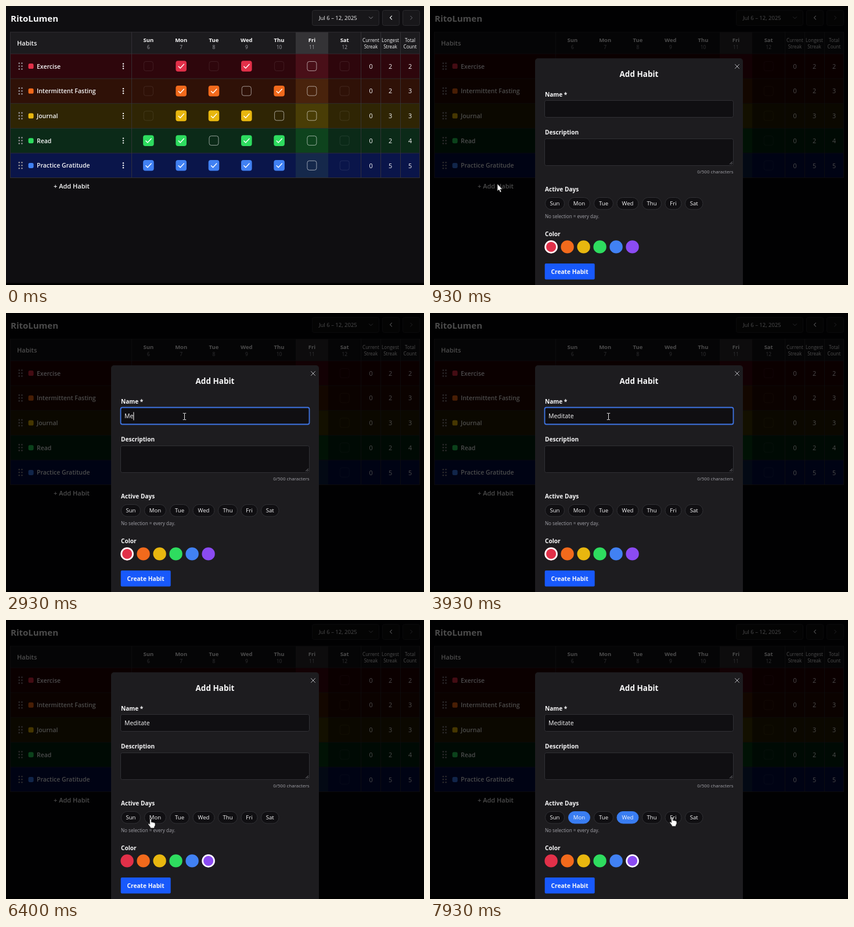
Write an HTML page that moves like this. It is 720 px wide and 480 px high and loops after 8 s.

```html
<!DOCTYPE html>
<html lang="en">
<head>
<meta charset="utf-8">
<title>Habit tracker</title>
<style>
  html, body { margin: 0; width: 100%; height: 100%; overflow: hidden; background: #0f0e11; }
  svg { display: block; width: 720px; height: 480px; font-family: "Open Sans", "Noto Sans", sans-serif; }
  text { fill: #f7f7f8; white-space: pre; }
  .semi { font-weight: 600; }
  .bold { font-weight: 700; }
  .medium { font-weight: 500; }
  .muted { fill: #a3a3aa; }
  .mid { text-anchor: middle; }
  .end { text-anchor: end; }
  .line { fill: none; stroke-linecap: round; stroke-linejoin: round; }
</style>
</head>
<body>
<svg id="stage" viewBox="0 0 720 480"></svg>
<script>
const LOOP = 8000;
const DAYS = ['Sun', 'Mon', 'Tue', 'Wed', 'Thu', 'Fri', 'Sat'];
const COLORS = ['#e23049', '#f26a1c', '#e8b70f', '#2edc5f', '#4181f3', '#8b4bf2'];
const NAME = 'Meditate';

// marks: x = done, o = open, - = inactive
const HABITS = [
  { name: 'Exercise', marks: '-x-x-o-', stats: [0, 2, 2], row: '#2e060c', today: '#490f18' },
  { name: 'Intermittent Fasting', marks: '-xxoxo-', stats: [0, 2, 3], row: '#2f1107', today: '#49230c' },
  { name: 'Journal', marks: '-xxxoo-', stats: [0, 3, 3], row: '#2f2504', today: '#493d06' },
  { name: 'Read', marks: 'xxoxxo-', stats: [0, 2, 4], row: '#0b2a18', today: '#0e431d' },
  { name: 'Practice Gratitude', marks: 'xxxxxo-', stats: [0, 5, 5], row: '#0a154a', today: '#15284b' },
];
const STATS = [['Current', 628.5], ['Longest', 662], ['Total', 696]];
const PILLS = [[198, 34], [238, 38], [282, 34], [321.5, 38], [365, 34], [404.5, 29], [439, 31.5]];

const text = (x, y, size, content, cls = '', extra = '') =>
  `<text x="${x}" y="${y}" font-size="${size}" class="${cls}" ${extra}>${content}</text>`;
const rect = (x, y, w, h, fill, r = 0, extra = '') =>
  `<rect x="${x}" y="${y}" width="${w}" height="${h}" rx="${r}" fill="${fill}" ${extra}/>`;
const line = (d, color = '#f4f4f5', width = 1, extra = '') =>
  `<path class="line" d="${d}" stroke="${color}" stroke-width="${width}" ${extra}/>`;
const dot = (x, y, r, fill, extra = '') =>
  `<circle cx="${x}" cy="${y}" r="${r}" fill="${fill}" ${extra}/>`;
const stroke = color => `stroke="${color}"`;
const dayX = i => 245.4 + i * 56.3;

function checkbox(mark, x, y, color) {
  if (mark === 'x') {
    return rect(x - 9.3, y - 9.3, 18.6, 18.6, color, 4) +
      line(`M${x - 4.5} ${y + .5}l3 3 6.3-6.8`, '#fff', 1.4);
  }
  const opacity = mark === 'o' ? .55 : .09;
  return rect(x - 8, y - 8, 16, 16, 'none', 3.5, `stroke="#fff" stroke-opacity="${opacity}"`);
}

function habitRow(habit, i) {
  const top = 82 + i * 42.7, y = top + 21.5, color = COLORS[i];
  const grip = [-5, 0, 5].map(d => dot(22.7, y + d, 1.3, '#98949a') + dot(27.4, y + d, 1.3, '#98949a')).join('');
  const menu = [-4, 0, 4].map(d => dot(202, y + d, 1.2, '#f4f4f5')).join('');
  return rect(8, top, 704.5, 42.7, habit.row) +
    rect(499, top, 56, 42.7, habit.today) +
    line(`M8 ${top + .3}H712`, '#343036', 1, 'opacity=".75"') +
    grip + menu +
    rect(38.5, y - 4.4, 9, 9, color, 2.6) +
    text(53, y + 4, 10.5, habit.name, 'semi') +
    [...habit.marks].map((m, d) => checkbox(m, dayX(d), y, color)).join('') +
    habit.stats.map((n, s) => text(STATS[s][1], y + 4.2, 10.8, n, 'mid medium')).join('');
}

function page() {
  const box = (x, w) => rect(x, 7.5, w, 26, '#18171a', 3, stroke('#2b2a2e'));
  return rect(0, 0, 720, 480, '#0f0e11') + rect(0, 476.5, 720, 3.5, '#000') +
    text(8, 27, 15, 'RitoLumen', 'bold') +
    box(527.5, 115) + box(648.5, 29) + box(683.5, 29) +
    text(539, 24, 9.5, 'Jul 6 – 12, 2025', 'medium') +
    line('M625.5 18.8l3 3 3-3', '#8c8c92') +
    line('M664.5 17.2l-3 3 3 3', '#f4f4f5', 1.2) +
    line('M696.7 17.2l3 3-3 3', '#707076') +
    rect(8, 45, 704.5, 37.5, '#1c1b1e') + rect(499, 45, 56, 37.5, '#343336') +
    text(19, 68, 11, 'Habits', 'semi') +
    DAYS.map((d, i) => text(dayX(i), 62, 9.5, d, 'mid bold') +
      text(dayX(i), 74, 8.4, 6 + i, 'mid muted medium')).join('') +
    STATS.map(([label, x], i) => text(x, 62, 8.1, label, 'mid') +
      text(x, 73, 8.1, i < 2 ? 'Streak' : 'Count', 'mid')).join('') +
    HABITS.map(habitRow).join('') +
    line('M216.5 45V295M611.5 45V295M645.5 45V295M679.5 45V295', '#39363b', 1, 'opacity=".8"') +
    rect(7.5, 45, 705, 250.5, 'none', 0, stroke('#302e32')) +
    text(113, 314, 11, '+ Add Habit', 'mid semi');
}

function dialog() {
  const field = (y, h, id = '') => rect(197.5, y, 325, h, '#100f12', 3, stroke('#303034') + id);
  const label = (y, content) => text(198, y, 10.1, content, 'bold');
  return rect(181, 90, 358, 410, '#1d1c1f', 5) +
    line('M525.5 100.5l7 7m0-7l-7 7', '#b5b5ba') +
    text(360, 122, 13.5, 'Add Habit', 'mid bold') +
    label(155.5, 'Name *') + field(162.5, 29, ' id="name"') +
    text(204, 181.2, 10.5, '', 'medium', 'id="typed"') +
    rect(0, 170.5, 1, 14, '#fff', 0, 'id="caret"') +
    label(221, 'Description') + field(228.5, 46) +
    line('M516.5 272l4-4M519 272.3l1.8-1.8', '#a0a0a5', .8) +
    text(522.5, 287.8, 8, '0/500 characters', 'end muted medium') +
    label(319, 'Active Days') +
    PILLS.map(([x, w], i) => rect(x + .5, 329.5, w - 1, 20.5, '#100f12', 10.3, `class="pill" ${stroke('#303034')}`) +
      text(x + w / 2, 343, 9.6, DAYS[i], 'mid medium')).join('') +
    text(198, 364.8, 8.1, 'No selection = every day.', 'muted medium') +
    label(396, 'Color') +
    COLORS.map((c, i) => dot(208.6 + i * 28, 414.4, 11.2, c)).join('') +
    dot(0, 414.4, 9.9, 'none', 'id="ring" stroke="#fff" stroke-width="2.7"') +
    rect(197.7, 443, 86, 27.5, '#1859fb', 2) +
    text(240.6, 460.5, 10.2, 'Create Habit', 'mid bold');
}

const POINTERS = `
  <path id="arrow" d="M0 0V12.6L2.8 10 4.8 14.6 7 13.6 5 9.2H8.8Z" fill="#fff" stroke="#111" stroke-width=".7"/>
  <path id="ibeam" class="line" d="M-2.3-5.5H-.7L0-5 .7-5.5H2.3M0-5V5M-2.3 5.5H-.7L0 5 .7 5.5H2.3" stroke="#e6e6e6"/>
  <path id="hand" d="M-1.3 1Q0-1 1.3 1V6Q2.4 5 3.6 6.2 4.8 5.4 5.8 6.7 8 6.2 8 8.6V11.5L6.6 14V16H-.4V14.4L-4 9.8Q-4.2 7.6-2.6 8.3L-1.3 9.6Z" fill="#fff" stroke="#111" stroke-width=".7"/>`;

const stage = document.getElementById('stage');
stage.innerHTML = `<g id="page">${page()}</g><g id="dialog">${dialog()}</g><g id="pointer">${POINTERS}</g>`;

const $ = id => document.getElementById(id);
const [backdrop, modal, nameField, typed, caret, ring, pointer] =
  ['page', 'dialog', 'name', 'typed', 'caret', 'ring', 'pointer'].map($);
const pills = [...document.querySelectorAll('.pill')];

const OPEN = 840, FOCUS = 1700, TYPE = 2780, KEY = 85, BLINK = 500;
const PICK_COLOR = 5300, PICK_DAY = { 1: 6600, 3: 7330 };
const PATH = [
  [130, 170, 490], [600, 116, 308], [800, 116, 306], [1050, 116, 306],
  [1550, 307.5, 178], [4270, 307.5, 178], [4900, 353, 428], [4960, 353, 428],
  [5150, 349, 415], [5600, 349, 415], [6250, 249, 342], [6750, 249, 342],
  [7100, 340, 342], [7500, 340, 342], [7850, 417, 339], [8000, 417, 339],
];

const clamp = v => Math.min(1, Math.max(0, v));
const ease = v => v * v * (3 - 2 * v);

function pointerAt(t) {
  const next = PATH.findIndex(p => p[0] > t);
  if (next <= 0) return PATH[0].slice(1);
  const [t0, x0, y0] = PATH[next - 1], [t1, x1, y1] = PATH[next];
  const k = ease((t - t0) / (t1 - t0));
  return [x0 + (x1 - x0) * k, y0 + (y1 - y0) * k];
}

function pointerKind(t, x, y) {
  const inside = (left, top, w, h) => x >= left && x <= left + w && y >= top && y <= top + h;
  if (t < OPEN) return inside(82, 302, 62, 17) ? 'hand' : 'arrow';
  if (inside(198, 163, 325, 29) || inside(198, 229, 325, 46)) return 'ibeam';
  const onPill = PILLS.some(([left, w]) => inside(left, 329, w, 21));
  const onColor = COLORS.some((c, i) => Math.hypot(x - 208.6 - i * 28, y - 414.4) < 11);
  return onPill || onColor || inside(198, 443, 86, 28) ? 'hand' : 'arrow';
}

function render(t) {
  const shown = ease(clamp((t - OPEN) / 85));
  // the slight contrast lift sinks the faintest lines into black
  backdrop.style.filter = shown ? `brightness(${1 - .69 * shown}) contrast(${1 + .03 * shown})` : 'none';
  modal.setAttribute('opacity', shown);
  const scale = .95 + .05 * shown;
  modal.setAttribute('transform', `translate(360 290) scale(${scale}) translate(-360 -290)`);

  const focused = t >= FOCUS && t < PICK_COLOR;
  nameField.setAttribute('stroke', focused ? '#3f75e4' : '#303034');
  nameField.setAttribute('stroke-width', focused ? 1.8 : 1);

  const count = Math.max(0, Math.min(NAME.length, Math.floor((t - TYPE) / KEY) + 1));
  typed.textContent = NAME.slice(0, count);
  const lastKey = count ? TYPE + (count - 1) * KEY : FOCUS;
  caret.setAttribute('x', 204 + (count ? typed.getComputedTextLength() : 0));
  caret.setAttribute('opacity', focused && (t - lastKey) % (2 * BLINK) < BLINK ? 1 : 0);

  ring.setAttribute('cx', 208.6 + (t < PICK_COLOR ? 0 : 5 * 28));
  pills.forEach((pill, i) => {
    const on = t >= PICK_DAY[i];
    pill.setAttribute('fill', on ? '#397df2' : '#100f12');
    pill.setAttribute('stroke', on ? '#397df2' : '#303034');
  });

  const [x, y] = pointerAt(t), kind = pointerKind(t, x, y);
  pointer.setAttribute('transform', `translate(${x} ${y})`);
  for (const shape of pointer.children) shape.style.display = shape.id === kind ? '' : 'none';
}

const start = performance.now();
function tick() {
  render((performance.now() - start) % LOOP);
  requestAnimationFrame(tick);
}
tick();
</script>
</body>
</html>
```
